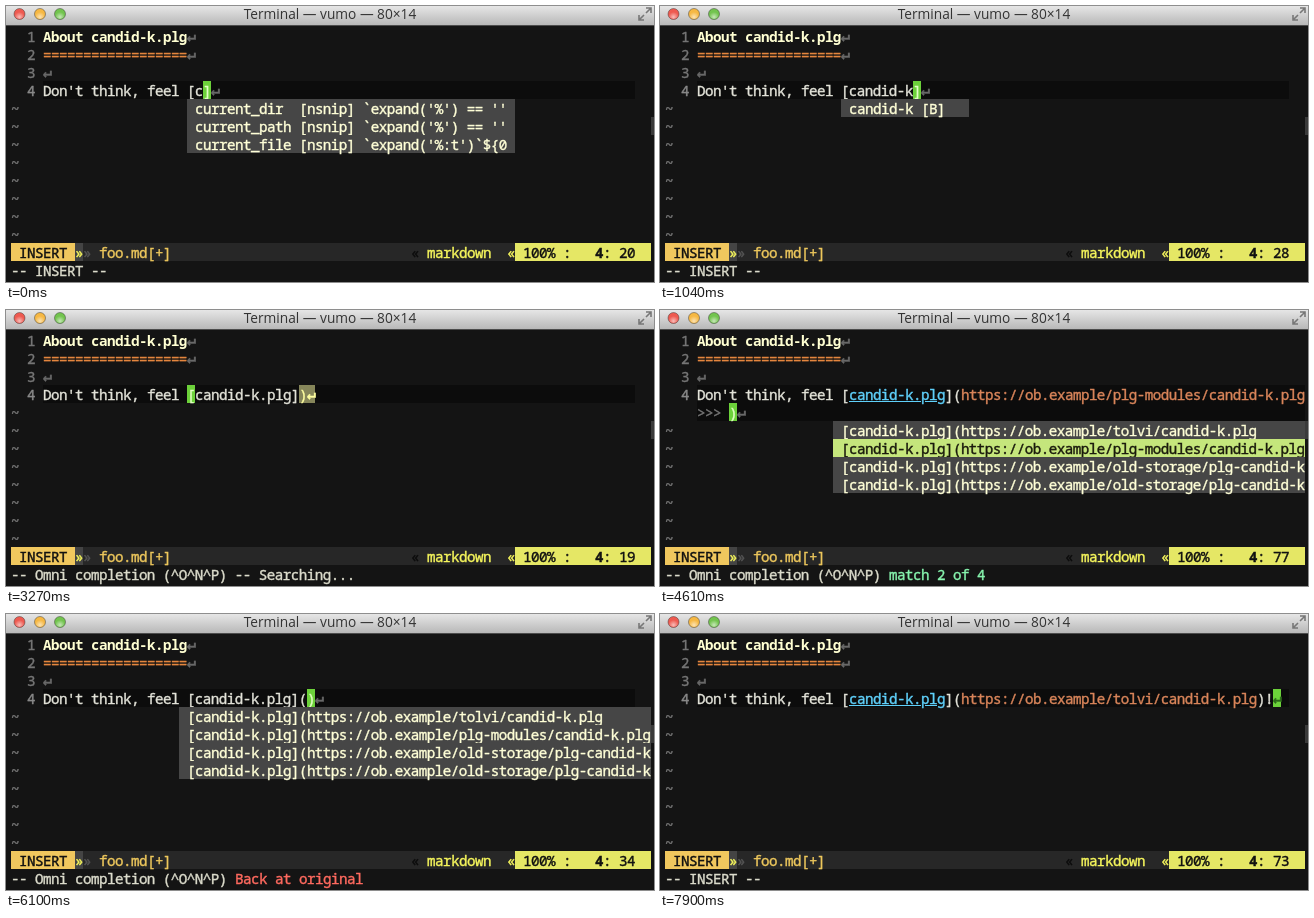
An HTML page for the animation above (8 s loop, 648 px wide and 276 px high).

```html
<!DOCTYPE html>
<html lang="en">
<head>
<meta charset="utf-8">
<title>Terminal</title>
<style>
  html, body { margin: 0; width: 100%; height: 100%; overflow: hidden; background: #141414; }
  #stage { position: relative; width: 648px; height: 276px; overflow: hidden; background: #141414; }
  #bar {
    position: absolute; left: 0; top: 0; width: 648px; height: 19px;
    background: linear-gradient(#e6e6e6, #b8b8b8); border-bottom: 1px solid #4c4c4c;
    font: 13.7px/16px "Open Sans", "Noto Sans", sans-serif; color: #333; text-align: center;
  }
  #bar svg { position: absolute; left: 0; top: 0; }
  #thumb { position: absolute; left: 645px; top: 111px; width: 3px; height: 18px; background: #3a3a3a; }
  #line { position: absolute; left: 37px; top: 75px; background: #0c0c0c; }
  .fill { position: absolute; top: 237px; height: 18px; }
  span {
    position: absolute; height: 18px; white-space: pre; color: #e2e2d8;
    font: 14.2px/19px "Noto Sans Mono", "Liberation Mono", monospace;
    letter-spacing: calc(8px - .6em);
    -webkit-text-stroke: .4px currentColor;
    font-variant-ligatures: none;
  }
  .head { color: #ffffd2; font-weight: 700; -webkit-text-stroke: 0; }
  .rule { color: #e5863f; }
  .num { color: #767676; }
  .now { color: #8a8a8a; }
  .eol {
    width: 8px; color: #686868; letter-spacing: 0;
    font: 700 15px/18px "DejaVu Sans Mono", monospace;
  }
  .link { color: #5fd0fa; text-decoration: underline; }
  .url { color: #d9855a; }
  .cur { background: #6cd13a; color: #e2ffc4; }
  .cur.eol { color: #2c6a1a; }
  .mark { background: #86865a; color: #ffffa0; }
  .menu { background: #464646; color: #ffffd7; }
  .sel { background: #c5e67c; color: #1a1a0c; }
  .mode { color: #dcdccc; }
  .ok { color: #87f5ae; }
  .warn { color: #ff6a5f; }
  .dark { color: #111; }
  .bold { font-weight: 700; }
  .gold { color: #edc75c; }
  .yell { color: #f6f65c; }
  .dim { color: #555; }
  .deep { color: #0c0c0c; }
</style>
</head>
<body>
<div id="stage">
  <div id="bar">Terminal — vumo — 80×14
    <svg width="648" height="19">
      <defs>
        <radialGradient id="gloss" cy=".8">
          <stop offset="0" stop-color="#fff" stop-opacity=".6"/>
          <stop offset="1" stop-color="#fff" stop-opacity="0"/>
        </radialGradient>
        <g id="shine" fill="url(#gloss)">
          <circle cx="13.5" cy="8" r="5"/>
          <circle cx="34" cy="8" r="5"/>
          <circle cx="54" cy="8" r="5"/>
        </g>
      </defs>
      <g stroke-opacity=".45" stroke="#333">
        <circle cx="13.5" cy="8" r="5.5" fill="#ee5a50"/>
        <circle cx="34" cy="8" r="5.5" fill="#f6b843"/>
        <circle cx="54" cy="8" r="5.5" fill="#72c44e"/>
      </g>
      <use href="#shine"/>
      <path d="M640 7l5-5m-5 0h5v5M638 9l-5 5m0-5v5h5" fill="none" stroke="#777" stroke-width="1.6"/>
    </svg>
  </div>
  <div id="line"></div>
  <div id="thumb"></div>
  <div class="fill" style="left:5px;width:64px;background:#f0c75e"></div>
  <div class="fill" style="left:69px;width:8px;background:#444"></div>
  <div class="fill" style="left:77px;width:432px;background:#272727"></div>
  <div class="fill" style="left:509px;width:136px;background:#e5e765"></div>
  <div id="base"></div>
  <div id="live"></div>
</div>
<script>
const LOOP = 8000, CELL = 8, ROW = 18, WRAP = 76, EOL = '↵';
const base = document.getElementById('base'), live = document.getElementById('live');
const line = document.getElementById('line');

const NAME = 'candid-k', FILE = NAME + '.plg';
const HOST = 'https://ob.example/';
const URLS = [
  HOST + 'tolvi/' + FILE,
  HOST + 'plg-modules/' + FILE,
  HOST + 'old-storage/plg-' + NAME,
  HOST + 'old-storage/plg-' + NAME + '-src'
];
const LEAD = "Don't think, feel ";
const OPEN = LEAD.length, LABEL = '[' + FILE + ']';
const PAREN = OPEN + LABEL.length;
const INSERT = '-- INSERT --', OMNI = '-- Omni completion (^O^N^P) ';

function put(layer, row, col, text, cls = '') {
  const el = document.createElement('span');
  el.className = cls;
  el.textContent = text;
  el.style.left = 5 + col * CELL + 'px';
  el.style.top = 21 + (row - 1) * ROW + 'px';
  layer.append(el);
}

// A step of the session: bracketed text, cursor index, and what surrounds it.
const steps = [];
function step(time, tail, cur, more = {}) {
  steps.push({ time, tail, cur, pos: cur + 1, marks: [], mode: INSERT, ...more });
}

const snippets = [
  "current_dir  [nsnip] `expand('%') == ''",
  "current_path [nsnip] `expand('%') == ''",
  "current_file [nsnip] `expand('%:t')`${0"
];
const snipMenu = { col: 22, width: 41, items: snippets };
const wordMenu = { col: 22, width: 16, items: [NAME + ' [B]'] };
const linkMenu = sel => ({ col: 21, width: 59, items: URLS.map(u => LABEL + '(' + u), sel });

function typed(time, n, more) {
  step(time, '[' + FILE.slice(0, n) + ']', OPEN + 1 + n, more);
}
function match(time, i, more) {
  step(time, LABEL + '(' + URLS[i] + ')', PAREN + 1 + URLS[i].length,
    { linked: true, menu: linkMenu(i), mode: OMNI, note: `match ${i + 1} of 4`, ...more });
}

typed(0, 1, { pos: 20, menu: snipMenu });
for (let i = 0; i < 7; i++) typed(140 + i * 150, i + 2, { menu: wordMenu });
typed(1340, 8, { mode: '', marks: [OPEN] });
for (let i = 0; i < 4; i++) typed(1490 + i * 150, 9 + i, { marks: [OPEN] });
step(2080, LABEL, PAREN, { marks: [OPEN, PAREN - 1] });
step(2530, LABEL + '()', PAREN + 1, { marks: [PAREN] });
step(3120, LABEL + '()', PAREN + 1, { marks: [PAREN], mode: OMNI });
step(3270, LABEL + ')', OPEN, { marks: [PAREN, PAREN + 1], mode: OMNI + '-- Searching...' });
match(3720, 0);
match(4610, 1);
match(5060, 2, { pos: 77 });
match(5510, 3, { pos: 77 });
step(6100, LABEL + '()', PAREN + 1,
  { menu: linkMenu(-1), mode: OMNI, note: 'Back at original', noteClass: 'warn' });
match(6550, 0, { pos: 34 });
match(7300, 0, { pos: 34, cur: -1, mode: '', note: '', prompt: 40 });
const done = LABEL + '(' + URLS[0] + ')', end = OPEN + done.length;
step(7450, done, end, { linked: true, marks: [PAREN, end - 1] });
step(7900, done + '!', end + 1, { linked: true });

function charClass(s, i, text) {
  const eol = i === text.length - 1 ? 'eol' : '';
  if (i === s.cur) return 'cur ' + eol;
  if (s.marks.includes(i)) return 'mark ' + eol;
  if (eol) return eol;
  if (s.linked) {
    if (i > OPEN && i < PAREN - 1) return 'link';
    if (i > PAREN && i < text.lastIndexOf(')')) return 'url';
  }
  return '';
}

function drawLine(s, text) {
  for (let i = 0; i < text.length;) {
    const cls = charClass(s, i, text), low = i >= WRAP;
    let j = i + 1;
    while (j < text.length && j !== WRAP && charClass(s, j, text) === cls) j++;
    put(live, low ? 5 : 4, low ? 8 + i - WRAP : 4 + i, text.slice(i, j), cls);
    i = j;
  }
}

function draw(s) {
  live.textContent = '';
  const text = LEAD + s.tail + EOL;
  const wrapped = text.length - 1 > WRAP;
  line.style.height = (wrapped ? 2 : 1) * ROW + 'px';
  line.style.width = (wrapped ? 76 : 74) * CELL + 'px';
  put(live, 5, wrapped ? 4 : 0, wrapped ? '>>>' : '~', 'num');
  drawLine(s, text);
  if (s.menu) {
    const { col, width, items, sel } = s.menu;
    items.forEach((item, i) => put(live, (wrapped ? 6 : 5) + i, col,
      (' ' + item).padEnd(width).slice(0, width), i === sel ? 'sel' : 'menu'));
  }
  put(live, 13, 76, String(s.pos), 'dark');
  put(live, 14, 0, s.mode, 'mode');
  if (s.note) put(live, 14, OMNI.length, s.note, s.noteClass || 'ok');
  if (s.prompt) put(live, 14, s.prompt, ' ', 'cur');
}

function drawBase() {
  const title = 'About ' + FILE;
  for (let i = 1; i < 5; i++) put(base, i, 2, String(i), i === 4 ? 'now' : 'num');
  put(base, 1, 4, title, 'head');
  put(base, 2, 4, '='.repeat(title.length), 'rule');
  [title.length, title.length, 0].forEach((n, i) => put(base, i + 1, 4 + n, EOL, 'eol'));
  for (let r = 6; r < 13; r++) put(base, r, 0, '~', 'num');
  put(base, 13, 1, 'INSERT', 'dark');
  put(base, 13, 8, '»', 'yell');
  put(base, 13, 9, '»', 'dim');
  put(base, 13, 11, 'foo.md[+]', 'gold');
  put(base, 13, 50, '«', 'deep');
  put(base, 13, 52, 'markdown', 'yell');
  put(base, 13, 62, '«', 'yell');
  put(base, 13, 64, '100% :', 'dark');
  put(base, 13, 73, '4', 'dark bold');
  put(base, 13, 74, ':', 'dark');
}

let shown = null;
function tick() {
  const t = performance.now() % LOOP;
  const s = steps.filter(x => x.time <= t).pop();
  if (s !== shown) draw(shown = s);
  requestAnimationFrame(tick);
}
drawBase();
tick();
</script>
</body>
</html>
```
